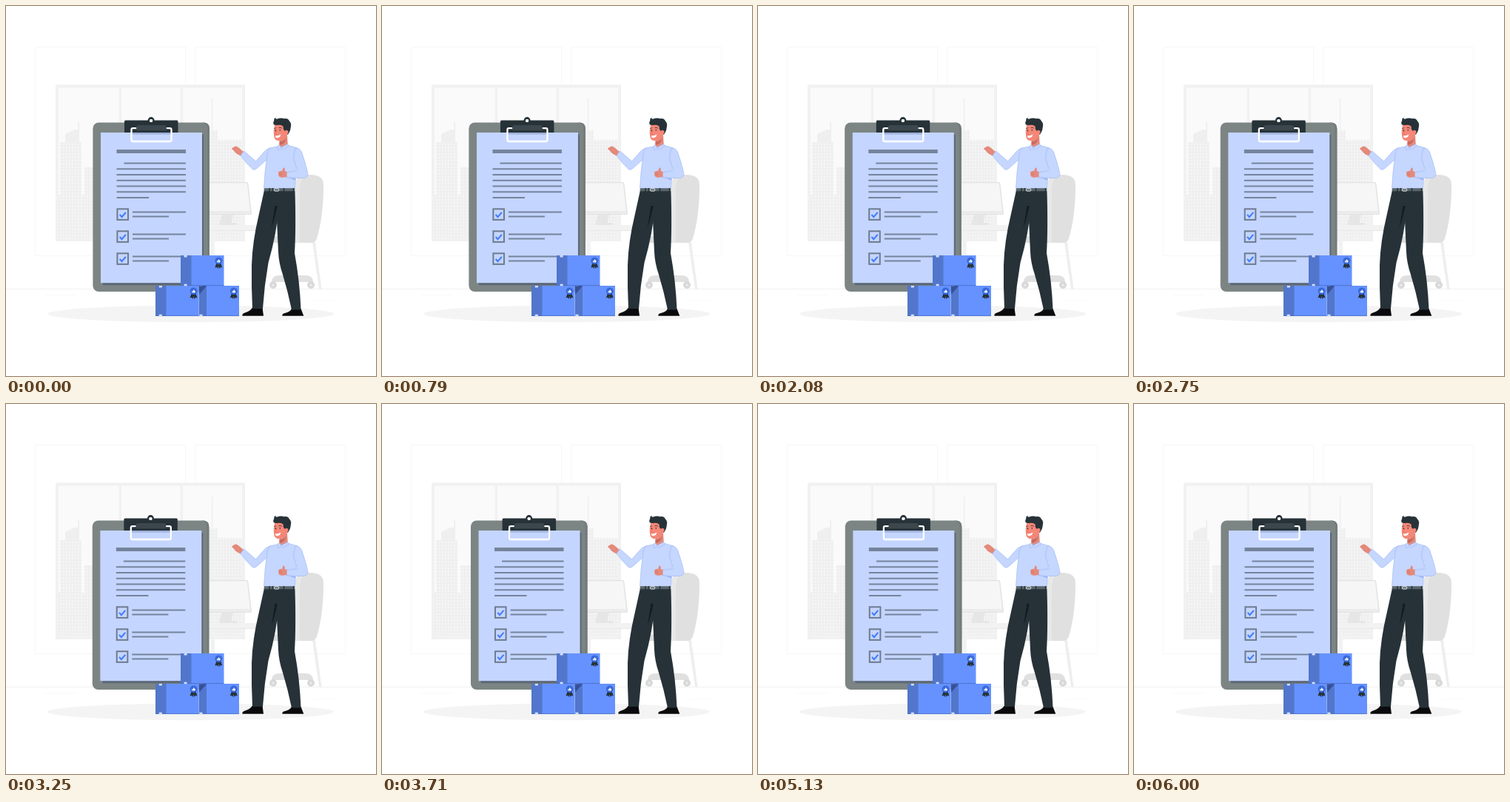
Recreate the animation shown at these times as an HTML page. Size 500 px wide and 500 px high, loop 6040 ms.

```html
<!DOCTYPE html>
<html lang="en">
<head>
<meta charset="utf-8">
<title>Checklist presentation</title>
<style>
  html, body { margin: 0; width: 100%; height: 100%; overflow: hidden; background: #fff; }
  svg { display: block; width: 100vw; height: 100vh; }
</style>
</head>
<body>
<svg viewBox="0 0 500 500">
  <defs>
    <pattern id="panes" width="4" height="4.4" patternUnits="userSpaceOnUse">
      <rect width="4" height="4.4" fill="#efefef"/>
      <rect x="1" y="1" width="2" height="2.2" fill="#f7f7f7"/>
    </pattern>
    <g id="badge">
      <path d="M-2.8 3 L-5 9.2 L-2.4 8.8 L-.8 10.6 L0 7 L.9 10.6 L2.6 8.8 L5 9.2 L2.8 3Z" fill="#263238"/>
      <circle r="4.4" fill="#3566d6" stroke="#3566d6" stroke-width="1.2" stroke-dasharray="1.4 .9"/>
      <path d="M-2.2 -.3h1.1v2.6h-1.1z M-.7 -.2 L.3 -2.4 Q1.2 -2.2 .8 -.6 H2.2 Q2.5 .8 1.8 2.3 H-.7Z" fill="#fff"/>
    </g>
  </defs>

  <!-- room -->
  <g fill="none" stroke="#f7f7f7" stroke-width="1">
    <rect x="39.5" y="55.5" width="203" height="282"/>
    <rect x="255.5" y="55.5" width="203" height="282"/>
  </g>
  <path d="M0 382.5H500" stroke="#f0f0f0" stroke-width="1"/>
  <path d="M416 398.5H447 M52 390.5H95" stroke="#f6f6f6" stroke-width=".7"/>

  <!-- window and skyline -->
  <rect x="67" y="106.3" width="256" height="211.7" fill="#f1f1f1"/>
  <g fill="#fafafa">
    <rect x="71" y="110.7" width="81.5" height="202.6"/>
    <rect x="156" y="110.7" width="79.5" height="202.6"/>
    <rect x="239" y="110.7" width="80" height="202.6"/>
  </g>
  <g fill="#efefef">
    <path d="M80 184V173L92 167H97V157H99V184Z"/>
    <path d="M277.8 125H279.4V170H286V200H272V170H277.8Z"/>
  </g>
  <g fill="url(#panes)">
    <path d="M73 184H102V313.3H73Z M71 255H76V313.3H71Z M106 218H120V313.3H106Z M102 255H106V313.3H102Z"/>
    <path d="M270 168H286V181H319V313.3H270Z"/>
  </g>

  <!-- desk -->
  <path d="M276.5 303H282V337H276.5Z" fill="#f2f2f2"/>
  <path d="M250 296H336Q341 296 341 299V304H250Z" fill="#f2f2f2"/>
  <path d="M250 303.4H341" stroke="#e8e8e8" stroke-width="1"/>
  <path d="M292 281H307L304.5 293H312V296H288Z" fill="#e6e6e6"/>
  <path d="M258 238H325Q327 238 327.4 240L332 280Q332 282 330 282H258Z" fill="#e3e3e3"/>
  <path d="M258 239.3H324.5Q325.7 239.3 326 240.5L330 277.5H258Z" fill="#f6f6f6"/>
  <path d="M258 277.5H330L330.4 281H258Z" fill="#ececec"/>

  <!-- chair -->
  <path d="M414 319H418L426.5 382H423Z" fill="#eee"/>
  <path d="M352 311H395V320H357Q352 320 352 315Z" fill="#dcdcdc"/>
  <path d="M391 240Q393 228 409 228Q429 227 429 242Q429 285 420 314Q418 320 412 320H391Z" fill="#e0e0e0"/>
  <path d="M391 240Q393 228 409 228Q398 231 397 246V320H391Z" fill="#e8e8e8"/>
  <path d="M381 320H389V364H404Q415 364 415 373H359Q359 364 370 364H381Z" fill="#e0e0e0"/>
  <g fill="#d9d9d9">
    <circle cx="361" cy="377" r="5"/><circle cx="412" cy="377" r="5"/>
  </g>
  <g fill="#ededed">
    <circle cx="361" cy="377" r="1.5"/><circle cx="412" cy="377" r="1.5"/>
  </g>

  <ellipse cx="249.5" cy="416" rx="193.5" ry="11.3" fill="#f4f4f4"/>

  <!-- clipboard -->
  <g id="board">
    <rect x="117.4" y="157.5" width="157.6" height="228.5" rx="8" fill="#7c8584"/>
    <path d="M267 157.5Q275 157.5 275 165.5V378Q275 386 267 386H264Q272 386 272 378V165.5Q272 157.5 264 157.5Z" fill="#737c7c"/>
    <rect x="131" y="174" width="136" height="203.3" fill="#5b6776"/>
    <rect x="128" y="171" width="137" height="203.2" fill="#c4d5ff"/>
    <path d="M169 171H224V173.5H169Z" fill="#9fb0d8"/>
    <path d="M161.5 154.6H191.6A4.5 4.5 0 1 1 200.6 154.6H231Q232.5 154.6 232.5 156.2V171H160V156.2Q160 154.6 161.5 154.6Z M196.1 152.9A2.1 2.1 0 1 0 196.1 157.1A2.1 2.1 0 1 0 196.1 152.9Z" fill="#263238" fill-rule="evenodd"/>
    <circle cx="196.1" cy="155" r="2.1" fill="#fff"/>
    <path d="M178 161H215L217 163V168.3H176V163Z" fill="#3b474d"/>
    <path d="M175.2 165.2H171.5Q169.5 165.2 169.5 167.2V181Q169.5 183 171.5 183H221.5Q223.5 183 223.5 181V167.2Q223.5 165.2 221.5 165.2H217.8" fill="none" stroke="#fff" stroke-width="2.3" stroke-linecap="round"/>
    <g id="text" stroke="#75849c" stroke-width="2" fill="none"></g>
  </g>

  <!-- boxes -->
  <g id="boxes"></g>
  <path d="M261 378.3H271L261 390Z" fill="#35519a"/>

  <!-- man -->
  <g id="man">
    <path d="M333 407.5H346.5L348 418.8H319.5Q318.5 416 323 414.5Q330 412.5 333 407.5Z" fill="#0b0b0d"/>
    <path d="M386 409H398.5L402.3 418.8H373.5Q372.5 416 377 415Q384 413.5 386 409Z" fill="#0b0b0d"/>
    <path d="M365 250H390.5Q392 300 390 334Q397 372 398.5 410.5H386Q381 386 374 363Q368.5 347 368 332L366 290Z" fill="#263238"/>
    <path d="M349 249H375L368.5 272Q366 307 354.5 347Q349 378 347 409H333Q331.5 380 332 350Q333 318 341.5 283Z" fill="#263238"/>
    <path d="M363.5 270Q361 288 358.5 300Q364 284 366.5 270Z" fill="#111a1e"/>

    <path d="M321.5 197.5L314.8 191.8Q311 188.5 308.5 190.2L305 192.3Q306 194.5 308 195.8Q311 200.5 317.5 202.5Z" fill="#e4897b"/>
    <g fill="#c5d6ff" stroke="#9ab5f3" stroke-width=".6" stroke-linejoin="round">
      <path d="M358 191.5Q352 192.5 348 198L337.5 209.8L321.5 195.8L316.8 202.2Q325 213 333 220.5Q336 222.5 339.5 219L353 207Z"/>
      <path d="M369 189.5L357.5 191.6Q353.5 195 352.5 203Q349.5 225 348.5 246.5H390.3L391.5 232L394 192Q388 189.8 380 188Z"/>
      <path d="M391 191.8Q397.5 192 399.8 198Q404 210 407.5 224Q409.5 232 402.5 232.5Q390 233.3 379 231.5V224.8L394 222.5Q389.5 211 388.5 204Z"/>
    </g>
    <path d="M379 231.3Q392 235.5 391 236V233Q385 232.8 379 231.3Z" fill="#9ab5f3"/>
    <path d="M369.5 179L380 174L380.8 187.5Q378 192 372.5 192.5L369.5 189.5Z" fill="#e4897b"/>
    <path d="M369.5 183.5Q376 183 379 178.5Q377 187 369.5 188Z" fill="#c9685c"/>
    <path d="M369.2 187.5L372 191L380.6 186.5L382.2 189.3L374.5 194L371.5 192.3L368 195L366 190Z" fill="#c5d6ff" stroke="#9ab5f3" stroke-width=".6"/>
    <path d="M379.5 223.8L376.8 223.2L376.5 219.2Q375 217.8 374.2 219.5L373.2 222.8Q369 222.8 368 225L368.4 229.2Q370 231.8 374 231.8L379.5 231Z" fill="#e4897b"/>
    <path d="M369 225.8H373 M369 228.2H373" stroke="#c9685c" stroke-width=".5"/>

    <path d="M363.3 160.5Q360.8 169 362.3 177Q363.3 181.5 367.5 182.2Q374 182.5 378.5 176L383 168L380 158L368 157Z" fill="#f58778"/>
    <path d="M362 160.5Q360.3 157 362.3 155.2Q361.5 152.8 364.3 150.8Q363.8 152.6 366 152.8Q371 150.5 376 152.2Q381 151.4 383 155.5Q386.2 158.5 384.8 163.8Q384.3 170 380.5 174L378.2 171L376.5 168.5Q374.2 167 374.8 163Q372.5 160 368 160.8Q364.5 161.3 362 160.5Z" fill="#263238"/>
    <ellipse cx="378.8" cy="170.8" rx="2.5" ry="3" fill="#f58778" transform="rotate(20 378.8 170.8)"/>
    <path d="M378 171Q379 169.2 380.2 169.6" fill="none" stroke="#c9685c" stroke-width=".5"/>
    <path d="M363.7 175.4Q367.8 175.7 371.4 173.6Q370.5 178.2 366.8 178.2Q364.2 178.2 363.7 175.4Z" fill="#fff"/>
    <path d="M365.8 167.8L363.6 173Q364.6 173.8 365.8 173.4" fill="none" stroke="#d4665a" stroke-width=".6"/>
    <g fill="#263238">
      <ellipse cx="364.4" cy="168.3" rx=".7" ry="1"/><ellipse cx="370.3" cy="167.7" rx=".7" ry="1"/>
    </g>
    <path d="M362.8 165.5L364.8 164.8 M369 164.5Q371 163.6 372.6 165" fill="none" stroke="#263238" stroke-width=".8" stroke-linecap="round"/>

    <path d="M349 246.3H390.4V250.3H348.4Z" fill="#59656b"/>
    <path d="M356 246V251 M360.5 246V251 M375.5 246V251 M388.5 246V251" stroke="#263238" stroke-width="1.4"/>
    <rect x="362.6" y="246.8" width="6" height="3.2" rx=".6" fill="#59656b" stroke="#e8ecee" stroke-width="1"/>
  </g>
</svg>

<script>
  const byId = id => document.getElementById(id);

  // Text rules and tick boxes on the sheet
  const rule = (x1, x2, y) => `M${x1} ${y}H${x2}`;
  let rules = rule(159.5, 243, 212.6) + rule(149.5, 193, 259.1);
  for (let i = 0; i < 5; i++) rules += rule(149.5, 243, 220.3 + i * 7.75);
  let ticks = '';
  for (let y = 274.3; y < 340; y += 30) {
    rules += rule(171, 243, y + 4.2) + rule(171, 220, y + 10.2);
    ticks += `<rect x="150.4" y="${y}" width="14.6" height="14.6" stroke="#6e7b8f"/>
      <path d="M153.7 ${y + 7.6}l2.8 3.2 5.4-6.2" stroke="#407bff" stroke-width="2.1"/>`;
  }
  byId('text').innerHTML =
    `<path d="M149.5 196.6H243" stroke-width="5"/><path d="${rules}"/>${ticks}`;

  // Carton: left edge, top, width, width of the shaded side, tape position
  const carton = (x, y, w, side, tape) => `
    <rect x="${x}" y="${y}" width="${w}" height="41" fill="#6692ff"/>
    <rect x="${x}" y="${y}" width="${side}" height="41" fill="#5176cb"/>
    <path d="M${x} ${y + 40.6}h${w}" stroke="#466cc4" stroke-width=".8"/>
    <path d="M${tape} ${y}h4v2.4h-4z M${tape} ${y + 38.8}h4v2.4h-4z" fill="#d3dfff"/>
    <use href="#badge" x="${x + w - 7.2}" y="${y + 7.3}"/>`;
  byId('boxes').innerHTML =
    carton(261, 378, 54, 10, 261.5) +
    carton(202, 378, 58.7, 14.5, 206.8) +
    carton(236, 337, 58.5, 14.5, 240.6);

  // Sideways shake: one offset per 600 ms, linear between, 24 steps a second
  const OFFSETS = [0, -1, 2, -4, 4, -4, 4, -4, 2, -1, 0];
  const LOOP = 6040, SPAN = 6000, STEP = 1000 / 24;

  function shake(ms) {
    const p = Math.min(ms, SPAN) / 600;
    const i = Math.min(Math.floor(p), 9);
    return OFFSETS[i] + (OFFSETS[i + 1] - OFFSETS[i]) * (p - i);
  }

  const board = byId('board');
  const start = performance.now();
  function draw(now) {
    const t = Math.max(0, now - start) % LOOP;
    const x = shake(Math.floor((t + 5) / STEP) * STEP);
    board.setAttribute('transform', `translate(${x.toFixed(3)} 0)`);
    requestAnimationFrame(draw);
  }
  draw(start);
</script>
</body>
</html>
```
